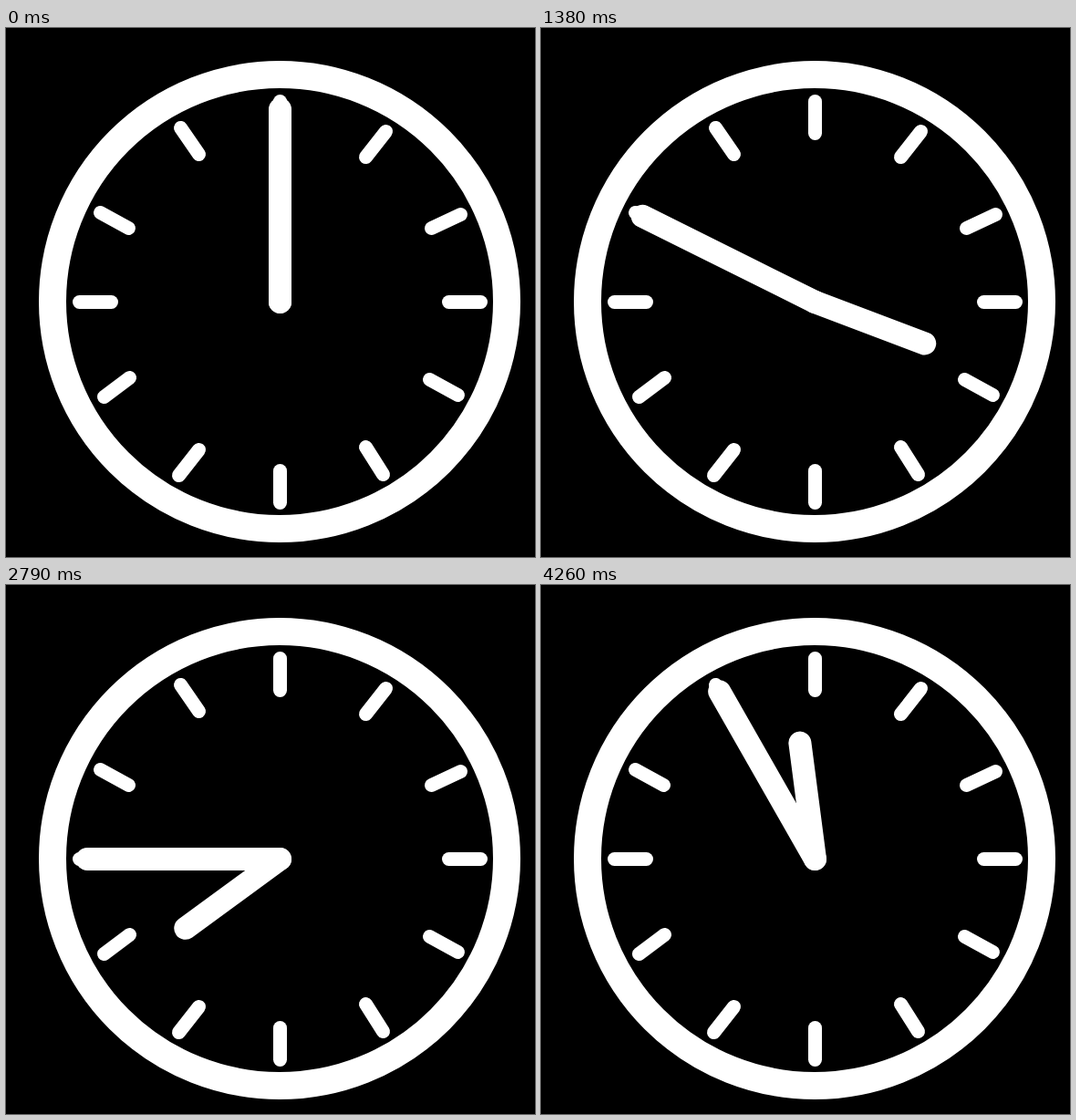
Recreate the animation shown at these times as an HTML page. Size 580 px wide and 580 px high, loop 4290 ms.

```html
<!DOCTYPE html>
<html lang="en">
<head>
<meta charset="utf-8">
<title>Clock</title>
<style>
  html, body { margin: 0; width: 100%; height: 100%; overflow: hidden; background: #000; }
  svg { display: block; width: 580px; height: 580px; }
  svg * { fill: none; stroke: #fff; stroke-linecap: round; }
</style>
</head>
<body>
<svg viewBox="0 0 580 580">
  <circle cx="300" cy="300" r="249" stroke-width="30"/>
  <g stroke-width="15">
    <path class="mark" d="M300.5 80.5V115.5"/>
    <path class="mark" d="M416.5 113.5L394.5 141.5"/>
    <path class="mark" d="M498.5 204.5L466.5 219.5"/>
    <path class="mark" d="M520.5 300.5H485.5"/>
    <path class="mark" d="M495.5 402.5L464.5 385.5"/>
    <path class="mark" d="M413.5 489.5L394.5 459.5"/>
    <path class="mark" d="M300.5 520.5V485.5"/>
    <path class="mark" d="M189.5 490.5L211.5 462.5"/>
    <path class="mark" d="M107.5 404.5L135.5 383.5"/>
    <path class="mark" d="M80.5 300.5H115.5"/>
    <path class="mark" d="M103.5 202.5L134.5 219.5"/>
    <path class="mark" d="M191.5 109.5L211.5 138.5"/>
  </g>
  <line id="hour" x1="300.5" y1="300.5" stroke-width="25"/>
  <line id="minute" x1="300.5" y1="300.5" stroke-width="25"/>
</svg>
<script>
const LOOP = 4290, STEP = 30, CENTRE = 300.5, TURN = 2 * Math.PI;
const SKIP = 118; // one five-minute step is left out here
const hour = document.getElementById('hour');
const minute = document.getElementById('minute');

// The dial is slightly uneven, so both hands follow the outer ends of its marks
const angles = [...document.querySelectorAll('.mark')].map(mark => {
  const { x, y } = mark.getPointAtLength(0);
  return (Math.atan2(x - CENTRE, CENTRE - y) + TURN) % TURN;
});
angles.push(TURN);

function dialAngle(position) {
  const i = Math.floor(position);
  return angles[i] + (angles[i + 1] - angles[i]) * (position - i);
}

function point(hand, position, length) {
  const a = dialAngle(position);
  hand.setAttribute('x2', (CENTRE + length * Math.sin(a)).toFixed(2));
  hand.setAttribute('y2', (CENTRE - length * Math.cos(a)).toFixed(2));
}

function draw(time) {
  let step = Math.floor((time % LOOP) / STEP);
  if (step >= SKIP) step++;
  point(hour, Math.floor(step / 3) / 4, 128.5); // moves every quarter hour
  point(minute, step % 12, 211.5);
}

const start = performance.now();
function tick() {
  draw(performance.now() - start);
  requestAnimationFrame(tick);
}
draw(0);
requestAnimationFrame(tick);
</script>
</body>
</html>
```
